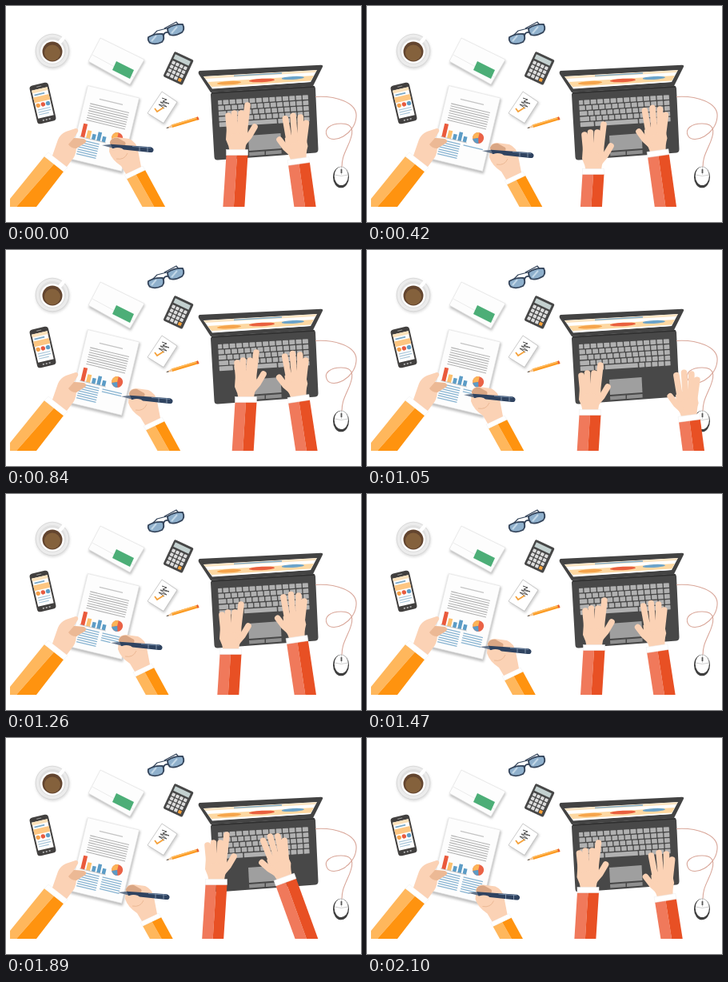
These frames come from a looping animation (444x270 px, 2.31 s). An HTML page:

```html
<!DOCTYPE html>
<html lang="en">
<head>
<meta charset="utf-8">
<title>Desk work</title>
<style>
html, body { margin: 0; width: 100%; height: 100%; overflow: hidden; background: #fff; }
svg { display: block; width: 444px; height: 270px; }
</style>
</head>
<body>
<svg id="stage" viewBox="0 0 444 270" xmlns="http://www.w3.org/2000/svg">
  <defs>
    <filter id="soft" x="-20%" y="-20%" width="140%" height="140%"><feGaussianBlur stdDeviation="1.8"/></filter>
    <clipPath id="floor"><rect x="5" width="434" height="251"/></clipPath>
    <clipPath id="display"><path d="M247 88L389 80L381 95L258 103.500Z"/></clipPath>
  </defs>

  <!-- coffee -->
  <circle cx="58.500" cy="57.500" r="21.500" fill="#cfcfcf" filter="url(#soft)" opacity=".7"/>
  <circle cx="58" cy="56" r="20.800" fill="#ececec" stroke="#d3d3d3" stroke-width=".8"/>
  <circle cx="58" cy="56" r="17" fill="#e0e0e0"/>
  <path d="M66 47L72 40" stroke="#fff" stroke-width="4.500" stroke-linecap="round"/>
  <circle cx="58" cy="57" r="14.800" fill="#fff"/>
  <circle cx="58" cy="57" r="12.500" fill="#63452f"/>
  <circle cx="58" cy="58.500" r="10" fill="#84613c"/>

  <!-- envelope -->
  <path d="M119 42L174 69L156 101L103 72Z" fill="#999" opacity=".6" filter="url(#soft)"/>
  <path d="M118 40L173 67L155 98L103 69Z" fill="#fdfdfd" stroke="#e2e2e2" stroke-width=".7"/>
  <path d="M108 61L160 89" stroke="#e6e6e6" stroke-width=".8"/>
  <path d="M138 69L160 80L155 91L133 80Z" fill="#4cae77"/>

  <!-- phone -->
  <g transform="translate(46 121.500) rotate(-13)">
    <rect x="-12" y="-24.500" width="24" height="49" rx="4" fill="#42403f"/>
    <rect x="-10" y="-18.500" width="20" height="36" fill="#fff"/>
    <rect x="-10" y="-18.500" width="20" height="4" fill="#fde2bb"/>
    <rect x="-8" y="-13" width="13" height="1.800" fill="#7aa9c8"/>
    <rect x="-10" y="-9.500" width="20" height="7" fill="#fdc681"/>
    <circle cx="-6.300" cy="1.500" r="2.700" fill="#f5a04a"/>
    <circle cx="0" cy="1.500" r="2.700" fill="#e85b40"/>
    <circle cx="6.300" cy="1.500" r="2.700" fill="#5f9cc5"/>
    <path d="M-8 7H8M-8 10H8M-8 13H5" stroke="#a9c6d9" stroke-width="1.200"/>
    <path d="M-3 -21.500H3" stroke="#999" stroke-width="1"/>
    <path d="M-5 21H5" stroke="#bbb" stroke-width="1.600" stroke-dasharray="2 2"/>
  </g>

  <!-- glasses -->
  <g fill="#8fb0cc" stroke="#34445a" stroke-width="1.800" stroke-linejoin="round">
    <path d="M180 40L189 31L205 27M219 27L213 20L198 28" fill="none" stroke-width="1.200"/>
    <path d="M178 39Q186 34 196 35Q199 41 195 45Q187 49 180 46Q177 43 178 39Z"/>
    <path d="M202 28Q211 22 221 23Q224 29 220 33Q212 38 205 36Q202 33 202 28Z"/>
    <path d="M197 37Q198 32 203 33" fill="none"/>
  </g>
  <path d="M182 44L188 37M207 34L214 26" stroke="#c3d8e8" stroke-width="2"/>

  <!-- calculator -->
  <g transform="translate(215.500 77.500) rotate(25)">
    <rect x="-13" y="-17" width="26.500" height="34.500" rx="2" fill="#474747"/>
    <rect x="-10.500" y="-14" width="21" height="6" fill="#c3d0cf"/>
    <g id="calc"></g>
  </g>

  <!-- notepad -->
  <path d="M196 109L216 121L198 149L178 136Z" fill="#999" opacity=".5" filter="url(#soft)"/>
  <path d="M195 107L214 120L197 146.500L177 134Z" fill="#fff" stroke="#bdbdbd" stroke-width=".8"/>
  <path d="M195 115L201 117L196 119L204 122L193 120L201 126L191 123L198 128" fill="none" stroke="#555" stroke-width="1"/>
  <path d="M186 128L189 132L197 127" fill="none" stroke="#f5a13a" stroke-width="1.800"/>

  <!-- pencil -->
  <path d="M207 148.500L240 138.500L241.500 142L208 152Z" fill="#fb9a22"/>
  <path d="M207 148.500L240 138.500L240.600 140L207.500 150Z" fill="#ffb95b"/>
  <path d="M207 148.500L200 153L208 152Z" fill="#f3c99d"/>
  <path d="M203 151L200 153L203.500 152.600Z" fill="#444"/>
  <path d="M238 139.100L240 138.500L241.500 142L239.500 142.600Z" fill="#e65a38"/>

  <!-- paper -->
  <g transform="translate(123.500 153) rotate(13.500)">
    <rect x="-33" y="-46" width="68" height="96" fill="#888" opacity=".55" filter="url(#soft)"/>
    <rect x="-33" y="-47" width="66" height="94" fill="#fdfdfd" stroke="#e3e3e3" stroke-width=".6"/>
    <path d="M-15 -34H15" stroke="#c4c4c4" stroke-width="1.300"/>
    <g id="para" stroke="#b3b3b3" stroke-width="1.100"></g>
    <path d="M-27 0h5v17h-5z" fill="#ea5a3c"/>
    <path d="M-20 7h5v10h-5z" fill="#fcc06f"/>
    <path d="M-13 10h4.500v7h-4.500zM-6.500 6h4.500v11h-4.500zM0 10h4.500v7h-4.500z" fill="#5c9cc6"/>
    <path d="M-28 17.300H5.500" stroke="#aaa" stroke-width=".6"/>
    <circle cx="18" cy="8" r="7" fill="#ea6246"/>
    <path d="M18 8V1A7 7 0 0 0 11.500 10.500Z" fill="#fcb457"/>
    <path d="M18 8L11.500 10.500A7 7 0 0 0 20 14.700Z" fill="#5c9cc6"/>
    <g id="left" stroke="#87b3d1" stroke-width="1.300"></g>
    <path id="notes" fill="none" stroke="#87b3d1" stroke-width="1.300"/>
  </g>

  <!-- laptop -->
  <path d="M242 81Q240 82 241 85L256 108L384 100L396 76Q397 74 394 73.800Z" fill="#434343"/>
  <g clip-path="url(#display)">
    <rect x="240" y="76" width="155" height="30" fill="#fff"/>
    <path d="M247 88L389 80L387 83L249 91Z" fill="#fde5c3"/>
    <path d="M285 87.300L345 84" stroke="#7aa9c8" stroke-width="1.300"/>
    <path d="M252 95L385 87L381 94L258 102Z" fill="#fdd8a2"/>
    <g transform="rotate(-3 320 94)">
      <ellipse cx="279" cy="94" rx="15" ry="2.200" fill="#f6a54c"/>
      <ellipse cx="320" cy="93" rx="16" ry="2.200" fill="#e9603f"/>
      <ellipse cx="359" cy="92" rx="14" ry="2" fill="#6ca4ca"/>
    </g>
    <path d="M258 102L381 94.500" stroke="#fff" stroke-width="2"/>
  </g>
  <path d="M259 107.500L383 99.500Q386.500 99.500 387 103L390.500 179Q390.500 183 387 183.500L265 192.500Q261 193 260.500 189L256 111Q256 108 259 107.500Z" fill="#484848"/>
  <path d="M257 109L386 101" stroke="#2f2f2f" stroke-width="1.500"/>
  <g id="keys" transform="matrix(1 -.061 .06 1 265 118)" fill="#b1b1b1"></g>
  <path d="M303 162L343.500 159L344.500 178L304 181Z" fill="#9f9f9f"/>
  <path d="M304 183L323.500 181.600V186L304.300 187.400ZM325 181.500L344.500 180L344.700 184.600L325 186Z" fill="#8f8f8f"/>

  <!-- mouse -->
  <path d="M387 113.500C411 112 440 120 438 139C436 161 409 173 402 163C396 153 407 147 419 147C438 147 434 161 427 176C422 187 420 192 420 202" fill="none" stroke="#d9a79a" stroke-width="1.100"/>
  <ellipse cx="419" cy="214" rx="10" ry="13.300" fill="#3f3f3f"/>
  <ellipse cx="419.300" cy="212.500" rx="8.600" ry="11.500" fill="#fff"/>
  <path d="M419.500 201V211M411 211Q419 214 428 211" fill="none" stroke="#c2c2c2" stroke-width=".8"/>
  <path d="M419.500 204V209" stroke="#555" stroke-width="1.800"/>

  <g clip-path="url(#floor)">
    <!-- holding arm -->
    <path d="M48 188L60 197.500L13 251H5V241Z" fill="#ffb75c"/>
    <path d="M60 197.500L72 207L38 251H13Z" fill="#ff930f"/>
    <path d="M53 183L77 202L72 207L48 188Z" fill="#fff" stroke="#eee" stroke-width=".5"/>
    <path d="M58 187L65 167Q68 160 75 157L87 153Q91 153 90 157L85 165L97 166Q102 168 99 171L88 178Q87 188 82 193L76 201Z" fill="#fbd2b5"/>
    <path d="M85 165L97 166Q102 168 99 171L88 178Q81 178 78 173Z" fill="#ecb995"/>

    <!-- writing arm, origin at the nib -->
    <g id="writer">
      <path d="M31 42L42.500 36.500L95 130H80Z" fill="#ffb75c"/>
      <path d="M42.500 36.500L54 31L108 130H95Z" fill="#ff930f"/>
      <path d="M28 37L51 26L54 31L31 42Z" fill="#fff" stroke="#eee" stroke-width=".5"/>
      <path d="M10 -4Q11 -10 19 -10L34 -8Q43 -4 45 6L49 27L30 36L24 26Q12 18 9 8Z" fill="#fbd2b5"/>
      <path d="M10 -4Q13 -10 20 -9L29 -4Q31 0 26 2L11 1Z" fill="#d9a684"/>
      <path d="M0 0L12 -1.200L13 3.500Z" fill="#64748a"/>
      <path d="M11 -1.300L61 2.300Q65 3.500 64.500 6.500Q64 9.500 60 9L13 4Z" fill="#2f4360"/>
      <path d="M38 1.500L61 3.300" stroke="#6e86a4" stroke-width="1"/>
      <path d="M47 1.300V7.500M57 2V8.600" stroke="#8092a8" stroke-width="1"/>
      <path d="M10 7Q16 1 25 4L32 10Q28 19 18 17Z" fill="#fbd2b5"/>
      <path d="M32 10Q28 19 18 17" fill="none" stroke="#ecb995" stroke-width="1"/>
    </g>
    <g id="typeL"></g>
    <g id="typeR"></g>
  </g>
</svg>
<script>
const $ = id => document.getElementById(id);
const LOOP = 2310;
const SKIN = '#fbd2b5';

// start time, nib x y, lines written, left cuff x y, right cuff x y angle
const poses = [
  [0, 120, 174, 0, 289, 183, 366, 194, -8],
  [420, 144, 181, 1, 283, 207, 364, 184, -8],
  [630, 122, 177, 1, 291, 196, 365, 187, -8],
  [840, 144, 183, 2, 300, 187, 366, 186, -8.7],
  [1050, 121, 181, 2, 279, 203, 403, 210, -7.5],
  [1260, 131, 186, 3.5, 281, 197, 364, 182, -8.5],
  [1470, 141, 191, 5, 284, 192, 363, 193, -8.8],
  [1680, 123, 188, 5, 270, 176, 358, 186, -12],
  [1890, 140, 193, 6, 263, 180, 349, 177, -20],
  [2100, 126.5, 193.500, 6.5, 276.5, 190, 373, 200, -9]
];

const rect = (x, y, w, h, extra = '') =>
  `<rect x="${x}" y="${y}" width="${w}" height="${h}" ${extra}/>`;

function lines(count, x, w, y, step) {
  let d = '';
  for (let i = 0; i < count; i++) {
    const part = Math.min(1, count - i);
    d += `M${x} ${y + i * step}h${w * part}`;
  }
  return d;
}

function calcKeys() {
  let s = '';
  for (let r = 0; r < 4; r++)
    for (let c = 0; c < 4; c++)
      s += rect(-10.3 + c * 5.4, -5.6 + r * 5.4, 4.2, 4.2,
        `rx=".8" fill="${c === 3 && r === 3 ? '#f5a13a' : '#dcdcdc'}"`);
  return s;
}

function keyboard() {
  let s = '';
  for (let r = 0; r < 5; r++) {
    const y = r * 6.9;
    if (r === 4) {
      s += rect(0, y, 17, 5.6, 'rx=".6"') + rect(18.5, y, 11, 5.6, 'rx=".6"') +
        rect(31, y, 41, 5.6, 'rx=".6"');
      for (let c = 0; c < 5; c++) s += rect(73.5 + c * 8.1, y, 6.8, 5.6, 'rx=".6"');
      continue;
    }
    const lead = 5 + r * 2.2;
    s += rect(0, y, lead, 5.6, 'rx=".6"');
    const pitch = (114 - lead - 1.3) / 13;
    for (let c = 0; c < 13; c++)
      s += rect(lead + 1.3 + c * pitch, y, pitch - 1.3, 5.6, 'rx=".6"');
  }
  return s;
}

// origin at the cuff centre, fingers pointing up
function arm(fingers, lean) {
  return `<path d="M-13.500 3H0L${lean} 130H${lean - 13.5}Z" fill="#f0795b"/>
    <path d="M0 3H13.500L${lean + 13.5} 130H${lean}Z" fill="#e85024"/>
    <path d="M-9 0Q-10 -8 -14 -16L-13 -31Q0 -37 13 -31L14 -17Q10 -8 10 0Z" fill="${SKIN}"/>
    <path d="${fingers}" fill="none" stroke="${SKIN}" stroke-width="7.600" stroke-linecap="round"/>
    ${rect(-13.5, -3.5, 27, 7, 'fill="#fff" stroke="#eee" stroke-width=".5"')}`;
}

$('calc').innerHTML = calcKeys();
$('keys').innerHTML = keyboard();
$('para').innerHTML = `<path d="${lines(8, -25, 50, -26, 3)}"/>`;
$('left').innerHTML = `<path d="${lines(7, -27, 25, 21, 3)}"/>`;
$('typeL').innerHTML = arm('M-9 -25L-11 -46M-3 -27L-3.500 -49M4 -27L5 -49M9 -25L13 -59M9 -13L15 -20L22 -32', -8);
$('typeR').innerHTML = arm('M-8 -25L-9 -55M-1 -27L1 -57M6 -27L10 -54M10 -24L16 -46M-9 -13L-14 -19L-20 -30', 0);

function draw(t) {
  const [, nx, ny, written, lx, ly, rx, ry, turn] = poses.findLast(p => p[0] <= t);
  $('writer').setAttribute('transform', `translate(${nx} ${ny})`);
  $('notes').setAttribute('d', lines(written, 2, 25, 21, 3));
  $('typeL').setAttribute('transform', `translate(${lx} ${ly})`);
  $('typeR').setAttribute('transform', `translate(${rx} ${ry}) rotate(${turn})`);
}

const start = performance.now();
function tick() {
  draw((performance.now() - start) % LOOP);
  requestAnimationFrame(tick);
}
tick();
</script>
</body>
</html>
```
